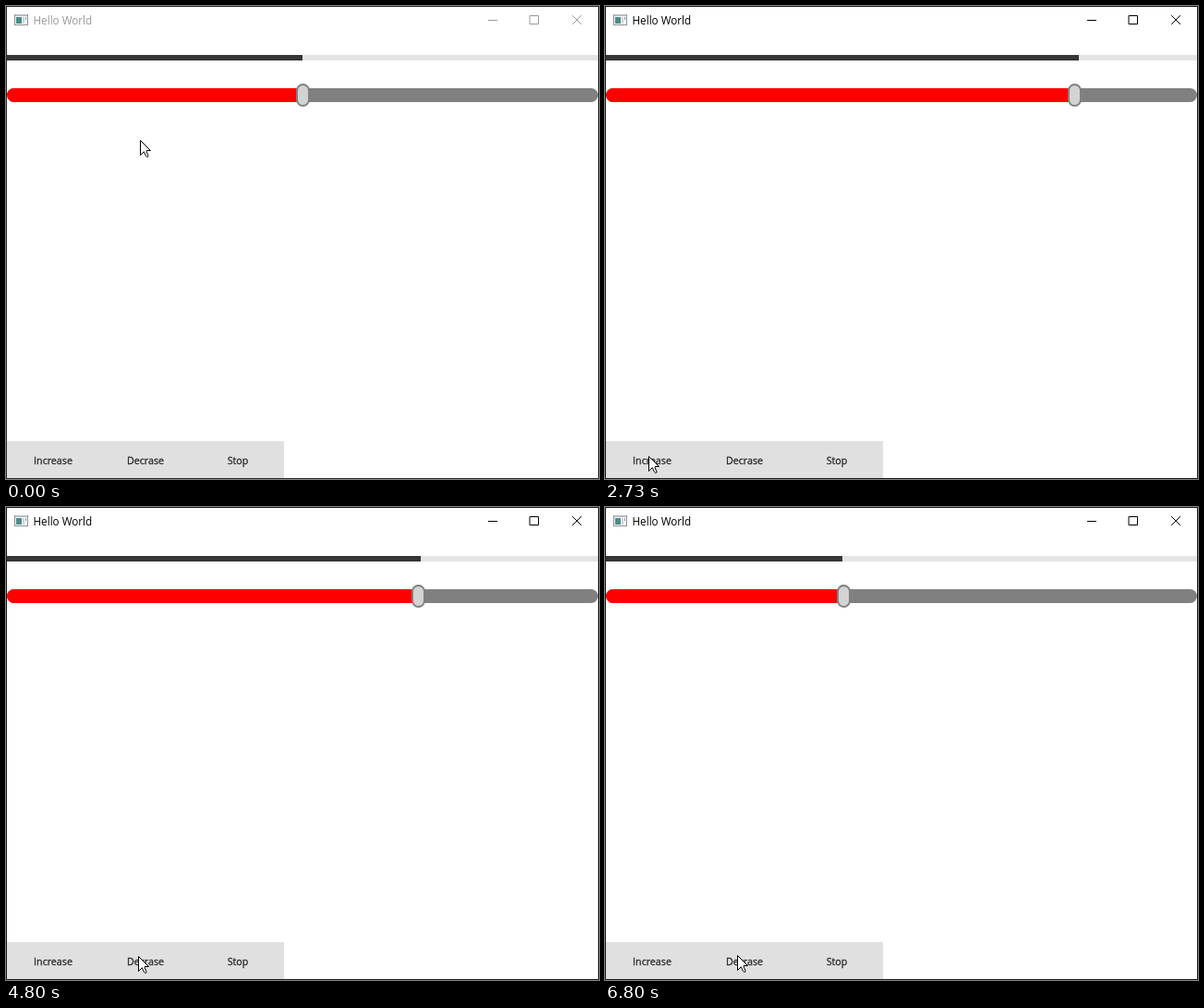
Animation, 642 px wide and 512 px high, one loop 7.67 s. Source, as an HTML page:

```html
<!DOCTYPE html>
<html lang="en">
<head>
<meta charset="utf-8">
<title>Hello World</title>
<style>
  html, body { margin: 0; width: 100%; height: 100%; overflow: hidden; background: #fff; }
  svg { display: block; width: 642px; height: 512px; }
  text { font-family: "Open Sans", "Noto Sans", sans-serif; }
  .title { font-size: 11.7px; fill: var(--ink); }
  .controls { fill: none; stroke: var(--ink); stroke-linecap: square; }
  .label { font-size: 10.7px; text-anchor: middle; fill: #26282a; stroke: #26282a; stroke-width: .3px; }
  .button { fill: #e0e0e0; }
  .button.down { fill: #cfcfcf; }
  #stage { --ink: #999; --edge: #2b2b2b; }
  #stage.active { --ink: #000; --edge: #1a1a1a; }
</style>
</head>
<body>
<svg id="stage" viewBox="0 0 642 512">
  <rect width="642" height="512" fill="#fff"/>

  <!-- title bar -->
  <g shape-rendering="crispEdges">
    <rect x="9.5" y="9.5" width="14" height="11" fill="#f4f5f6" stroke="#8d9299"/>
    <rect x="10" y="9" width="13" height="2" fill="#b9bec4"/>
    <rect x="11" y="12" width="6" height="7" fill="#4b8c88"/>
    <rect x="18" y="12" width="2" height="7" fill="#cfd4da"/>
    <rect x="21" y="12" width="1" height="3" fill="#7f9fc4"/>
  </g>
  <text class="title" x="29.5" y="20">Hello World</text>
  <g class="controls">
    <path d="M522.5 15.5H531.5M567.5 10.5H576.5V19.5H567.5Z"/>
    <path d="M613.5 10.5L622.5 19.5M622.5 10.5L613.5 19.5"/>
  </g>

  <!-- progress bar -->
  <rect x="1" y="53" width="640" height="6" fill="#e4e4e4"/>
  <rect id="progress" x="1" y="53" height="6" fill="#353637"/>

  <!-- slider -->
  <rect x="1" y="89" width="640" height="15" rx="7.5" fill="#808080"/>
  <rect id="fill" x="1" y="89" height="15" rx="7.5" fill="#f00"/>
  <rect id="handle" y="85" width="13" height="23" rx="6.5" fill="#d3d3d3" stroke="#808080" stroke-width="2"/>

  <!-- buttons -->
  <rect class="button" id="up" x="1" y="471" width="100" height="40"/>
  <rect class="button" id="down" x="101" y="471" width="100" height="40"/>
  <rect class="button" x="201" y="471" width="100" height="40"/>
  <text class="label" x="51" y="496">Increase</text>
  <text class="label" x="151" y="496">Decrase</text>
  <text class="label" x="251" y="496">Stop</text>

  <rect x=".5" y=".5" width="641" height="511" fill="none" stroke="var(--edge)"/>

  <path id="cursor" fill="#fff" stroke="#000"
    d="M.5 .5V16.5L4.3 12.7L6.6 17.6Q7.2 18.5 8 18.5Q9.2 18.3 9 17.2L7.2 12.8V11.5H11.5Z"/>
</svg>
<script>
const LOOP = 7670, FPS = 15;
const SLIDE = 250, BEAT = 665, STEP = .1;
const LEAD = 105, HOLD = 20;  // a press spans the moment its slide starts
const $ = id => document.getElementById(id);

const clamp = x => Math.min(1, Math.max(0, x));
const ease = x => x * x * (3 - 2 * x);
const overshoot = x => 1 + 2.5 * (x - 1) ** 3 + 1.5 * (x - 1) ** 2;
const span = (t, from, to) => ease(clamp((t - from) / (to - from)));

// a lone click, then more in a steady beat
const clicks = (first, next, count) =>
  [first, ...Array.from({ length: count }, (_, i) => next + i * BEAT)];
const ups = clicks(967, 1810, 3);
const downs = clicks(3950, 4550, 4);

const slid = (starts, t) => starts.reduce((sum, s) => sum + clamp((t - s) / SLIDE), 0);
const pressed = (starts, t) => starts.some(s => t >= s - LEAD && t < s + HOLD);

function cursorAt(t) {
  const reach = overshoot(span(t, 0, 800));
  const across = span(t, 3410, 3800);
  const nudge = span(t, 5800, 5870);
  return [145 - 98 * reach + 96 * across, 145 + 342 * reach - across - nudge].map(Math.round);
}

function draw(t) {
  const value = .5 + STEP * (slid(ups, t) - slid(downs, t));
  const width = Math.round(640 * value);
  $("progress").setAttribute("width", width);
  $("fill").setAttribute("width", width);
  $("handle").setAttribute("x", 2 + Math.round(625 * value));
  $("up").classList.toggle("down", pressed(ups, t));
  $("down").classList.toggle("down", pressed(downs, t));
  $("stage").classList.toggle("active", t >= ups[0] - LEAD);
  $("cursor").setAttribute("transform", `translate(${cursorAt(t)})`);
}

// the screen refreshes 15 times a second
const begin = performance.now();
function tick() {
  const t = (performance.now() - begin) % LOOP;
  draw(Math.floor(t * FPS / 1000 + .06) * 1000 / FPS);
  requestAnimationFrame(tick);
}
tick();
</script>
</body>
</html>
```
